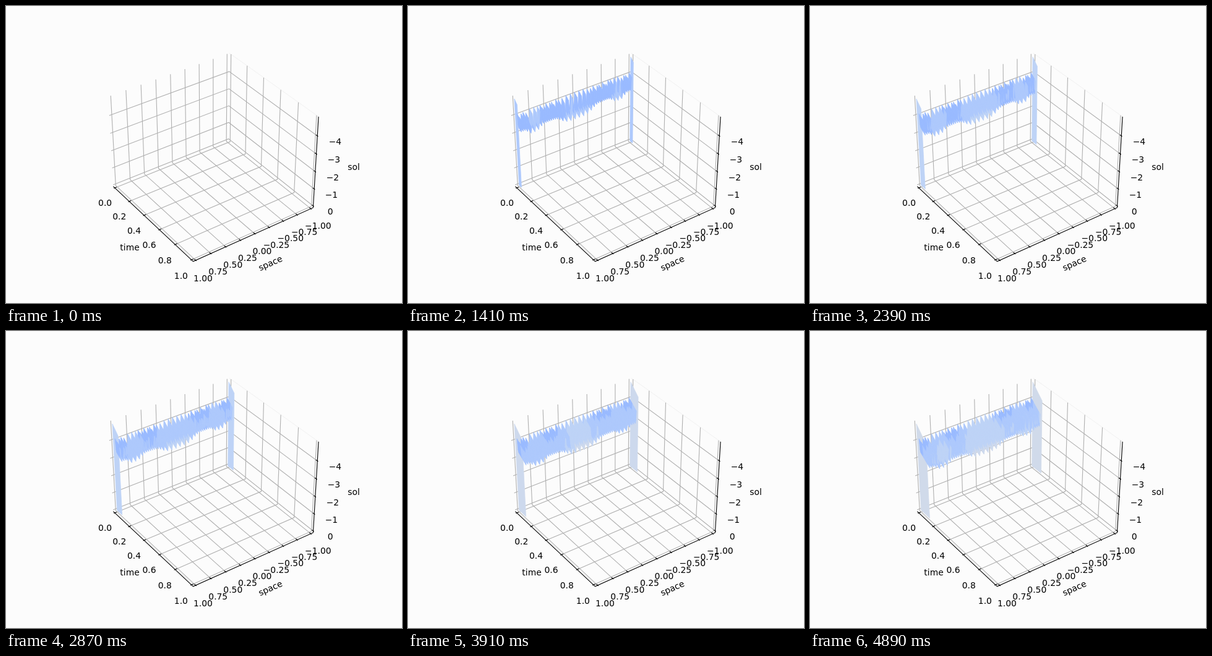
Animation of 640x480 px, one loop 4.91 s. Source, as an HTML page with a canvas:

```html
<!DOCTYPE html>
<html lang="en">
<head>
<meta charset="utf-8">
<title>Growing surface</title>
<style>
html, body { margin: 0; width: 100%; height: 100%; overflow: hidden; background: #fcfcfc; }
canvas { display: block; }
</style>
</head>
<body>
<canvas id="stage" width="640" height="480"></canvas>
<script>
const ctx = document.getElementById('stage').getContext('2d');
const STEPS = 243, LOOP = 4910, END_TIME = .12, DECAY = 1.23;
const SHADES = ['rgb(154,187,255)', 'rgb(174,201,252)', 'rgb(190,211,246)', 'rgb(205,217,237)', 'rgb(208,218,234)'];

const clamp = (v, lo, hi) => Math.max(lo, Math.min(hi, v));
const bump = (x, center, width) => Math.exp(-(((x - center) / width) ** 4));

// Camera: azimuth -35 degrees, elevation 35 degrees, distance 10.
// Box coordinates run from 0 to 1: time, space (1 to -1) and height.
const SIN = Math.sin(35 * Math.PI / 180), COS = Math.cos(35 * Math.PI / 180);

function project([a, b, c]) {
  const x = (a - .5) * 8 / 7, y = (b - .5) * 8 / 7, z = (c - .5) * 6 / 7;
  const near = COS * x - SIN * y;
  const scale = 1997.8 / (10 - COS * near - SIN * z);
  return [333 + (SIN * x + COS * y) * scale, 237.4 + (SIN * near - COS * z) * scale];
}

function line(color, ...points) {
  ctx.strokeStyle = color;
  ctx.lineWidth = 1.11;
  ctx.beginPath();
  points.forEach(p => ctx.lineTo(...project(p)));
  ctx.stroke();
}

function label(text, point, drop, angle = 0) {
  const [x, y] = project(point);
  ctx.save();
  ctx.translate(x, y);
  ctx.rotate(angle);
  ctx.fillText(text, 0, drop);
  ctx.restore();
}

const LO = -1 / 48, HI = 49 / 48;
const TICK_IN = 1 / 60, TICK_OUT = 1 / 120, PAD = .0864, LABEL_PAD = .1879;
const Z_RANGE = 4.94;
const signed = (v, digits) => v.toFixed(digits).replace('-', '\u2212');

function drawAxes() {
  const grid = '#b0b0b0', ink = '#000';
  const near = LO - PAD, far = HI + PAD;
  ctx.fillStyle = ink;
  ctx.font = '13.89px "DejaVu Sans", sans-serif';
  ctx.textAlign = 'center';
  line('#f2f2f2', [LO, HI, HI], [HI, HI, HI]);

  for (let i = 0; i <= 5; i++) {
    const t = i / 5;
    line(grid, [t, LO, LO], [t, HI, LO], [t, HI, HI]);
  }
  for (let i = 0; i <= 8; i++) {
    const s = i / 8;
    line(grid, [HI, s, LO], [LO, s, LO], [LO, s, HI]);
  }
  for (let i = 0; i <= 4; i++) {
    const z = i / Z_RANGE;
    line(grid, [LO, LO, z], [LO, HI, z], [HI, HI, z]);
  }

  line(ink, [LO, LO, LO], [HI, LO, LO], [HI, HI, LO], [HI, HI, HI]);

  for (let i = 0; i <= 5; i++) {
    const t = i / 5;
    line(ink, [t, LO - TICK_OUT, LO], [t, LO + TICK_IN, LO]);
    label(t.toFixed(1), [t, near, near], 11);
  }
  for (let i = 0; i <= 8; i++) {
    const s = i / 8;
    line(ink, [HI + TICK_OUT, s, LO], [HI - TICK_IN, s, LO]);
    label(signed(1 - i / 4, 2), [far, s, near], 11);
  }
  for (let i = 0; i <= 4; i++) {
    const z = i / Z_RANGE;
    line(ink, [HI + TICK_OUT, HI, z], [HI - TICK_IN, HI, z]);
    label(signed(-i, 0), [far, far, z], 11);
  }

  const low = LO - LABEL_PAD, high = HI + LABEL_PAD;
  const [x0, y0] = project([HI, LO, LO]), [x1, y1] = project([HI, HI, LO]);
  label('time', [.5, low, low], 4);
  label('space', [high, .5, low], 4, Math.atan2(y1 - y0, x1 - x0));
  label('sol', [high, high, .5], 4);
}

// The wave is symmetric about space 0 and widens there and near +-0.7.
const middle = s => bump(s, 0, .27);
const shoulder = s => bump(Math.abs(s), .71, .12);

function makeWave() {
  const cycle = [[0, 0], [.25, .7], [.5, 1], [.75, .7]];
  const half = [];
  for (let s = 0, i = 0; s < .975; i++) {
    const c = middle(s), w = shoulder(s);
    const period = .032 + .042 * c + .035 * w;
    const crest = .83 - .05 * (1 - c) * (1 - w) * (.5 + .5 * Math.sin(2.3 * i));
    const valley = .67 - .09 * c - .06 * w;
    for (const [phase, drop] of cycle) {
      const at = s + phase * period;
      if (at < .975) half.push({ s: at, z: crest + (valley - crest) * drop, drop });
    }
    s += period;
  }
  const mirrored = half.slice(1).map(p => ({ ...p, s: -p.s }));
  return [...half.reverse(), ...mirrored];
}

const wave = makeWave();

function sweep(color, a, b, from, to) {
  const at = (p, t) => ctx.lineTo(...project([t, (1 - p.s) / 2, p.z * Math.exp(-DECAY * t)]));
  ctx.fillStyle = ctx.strokeStyle = color;
  ctx.lineWidth = .7;
  ctx.beginPath();
  at(a, from);
  at(b, from);
  at(b, to);
  at(a, to);
  ctx.closePath();
  ctx.fill();
  ctx.stroke();
}

function shadeAt(s, drop, i, u, stride) {
  const c = middle(s), w = shoulder(s);
  let level = .1 + .7 * w + .4 * c + (stride - 1) * (.1 + .15 * w + .75 * c)
    + u * 1.6 * (1 - .8 * w - .9 * c) + .12 * Math.sin(i * 1.7);
  if (drop < .37 && c > .5) level *= .7;
  return SHADES[clamp(Math.floor(level), 0, 3)];
}

function drawSurface(step) {
  const grown = step / STEPS, stride = Math.ceil(step / 50);
  const wall = SHADES[clamp(stride - 1, 1, 4)];
  for (const s of [-1, 1]) sweep(wall, { s, z: 1 }, { s, z: 0 }, 0, grown * END_TIME);

  const chunks = 8;
  for (let c = 0; c < chunks && c / chunks < grown; c++) {
    const from = c / chunks, to = Math.min(grown, (c + 1) / chunks);
    for (let i = wave.length - 2; i >= 0; i--) {
      const a = wave[i], b = wave[i + 1];
      const color = shadeAt(a.s, (a.drop + b.drop) / 2, i, from, stride);
      sweep(color, a, b, from * END_TIME, to * END_TIME);
    }
  }
}

function frame(now) {
  const t = now % LOOP;
  const step = t < 50 ? 0 : 1 + Math.floor((t - 50) / 20);
  ctx.fillStyle = '#fcfcfc';
  ctx.fillRect(0, 0, 640, 480);
  drawAxes();
  if (step) drawSurface(step);
}

const start = performance.now();
(function loop() {
  frame(performance.now() - start);
  requestAnimationFrame(loop);
})();
</script>
</body>
</html>
```
